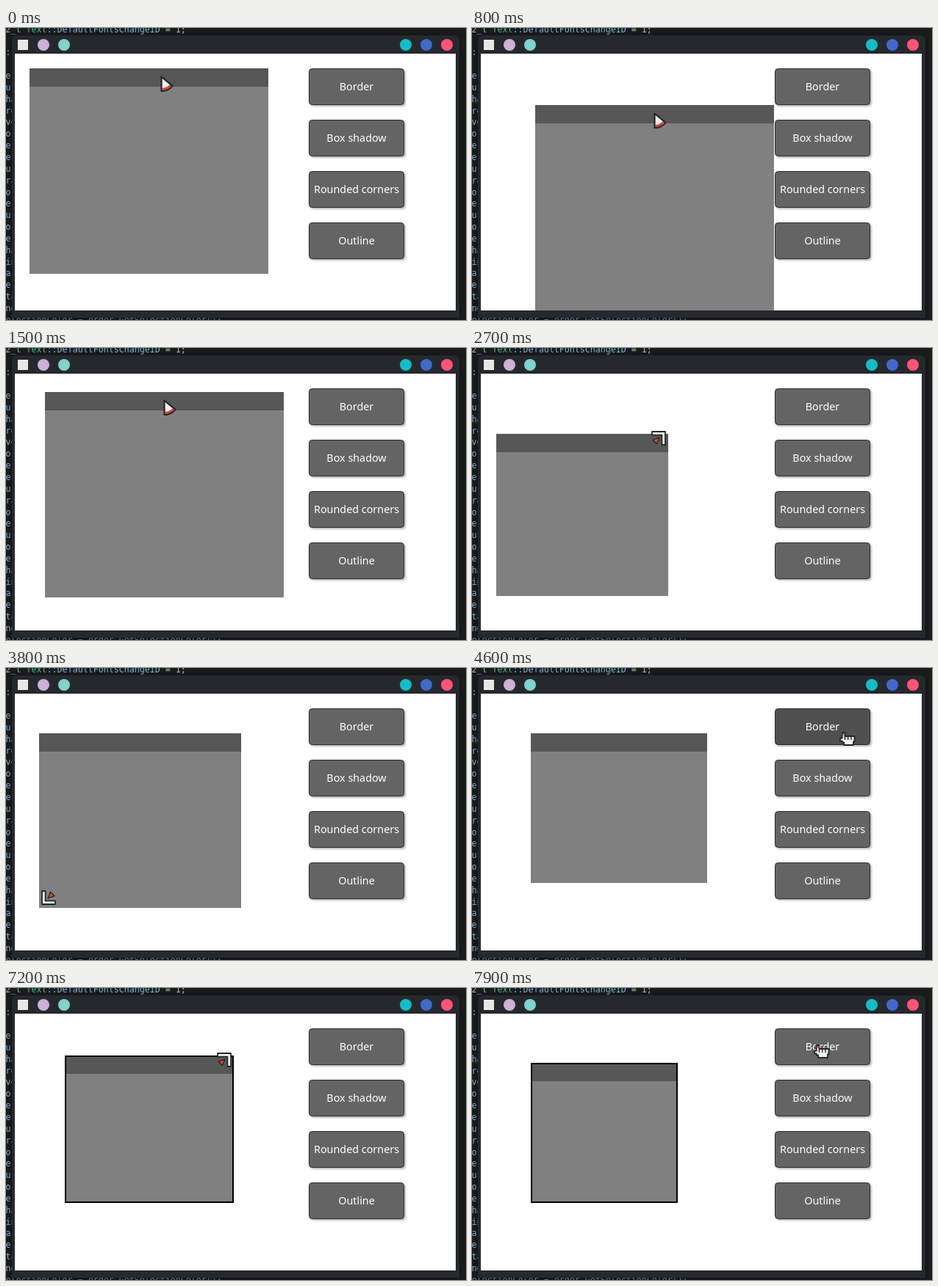
An HTML page that plays this animation: 626x398 px, repeating every 8000 ms.

```html
<!DOCTYPE html>
<html lang="en">
<head>
<meta charset="utf-8">
<title>Resizable window demo</title>
<style>
  html, body { margin: 0; height: 100%; overflow: hidden; background: #1b1c1d; }
  svg { display: block; width: 626px; height: 398px; }
  filter { color-interpolation-filters: sRGB; }
  #code { font: 11.65px "DejaVu Sans Mono", monospace; fill: #7db6d6; white-space: pre; }
  .type { fill: #45b598; }
  .plain { fill: #a9bfb2; }
  .button rect { fill: #646464; stroke: #2c2c2c; filter: url(#soft); }
  .button text { font: 14.35px "Noto Sans", sans-serif; fill: #fff; text-anchor: middle; }
  .cursor { stroke: #262626; stroke-width: 1.8; stroke-linejoin: round; fill: #f0f0ee; }
  .cursor .red { fill: #d8452f; }
</style>
</head>
<body>
<svg viewBox="0 0 626 398">
  <defs>
    <filter id="soft" x="-10%" y="-20%" width="120%" height="150%">
      <feDropShadow dx="2" dy="2" stdDeviation="1.3" flood-color="#000" flood-opacity=".28"/>
    </filter>
    <filter id="frameShadow">
      <feDropShadow dx="0" dy="1" stdDeviation="4" flood-color="#000" flood-opacity=".4"/>
    </filter>
    <clipPath id="content"><rect x="12" y="35" width="600" height="350"/></clipPath>
  </defs>

  <rect width="626" height="398" fill="#1b1c1d"/>
  <g id="code"></g>

  <path d="M8 395V17q0-7 7-7H610q7 0 7 7V395z" fill="#25292e" filter="url(#frameShadow)"/>
  <rect x="12" y="35" width="600" height="350" fill="#fff"/>
  <rect x="16" y="16" width="14" height="14" fill="#ebe7e1"/>
  <g id="dots"></g>
  <g id="buttons"></g>

  <g clip-path="url(#content)">
    <rect id="body" fill="#808080"/>
    <rect id="title" height="25" fill="#575757"/>
    <rect id="border" fill="none" stroke="#000" stroke-width="2"/>
  </g>

  <g id="arrow" class="cursor">
    <path d="M.5.5 15.5 13Q10 20 .5 20z"/>
    <path class="red" stroke="none" d="M1.4 16Q8 15.6 12 11L14.3 13Q9.5 19.1 1.4 19.1z"/>
    <path fill="none" d="M.5.5 15.5 13Q10 20 .5 20z"/>
  </g>
  <g id="corner" class="cursor">
    <path d="M-18 1H0V19H-4.6V5.6H-18z"/>
    <path class="red" stroke-width="1.3" d="M-8 9-17 12.3-11.5 17.7z"/>
  </g>
  <g id="hand" class="cursor">
    <path d="M2.8 1H6.5V6H19.5V13.5H18V18H5.2V14.5H2.8V12.5H0V8.5H2.8z"/>
    <path class="red" stroke="none" d="M3.6 1.8H5.8V4.5H3.6z"/>
    <path fill="none" stroke-width="1.4" d="M6.5 6V11M10.7 7V11M15 7V11"/>
  </g>
</svg>
<script>
const $ = id => document.getElementById(id);
const LOOP = 8000, STEP = 100;
const BUTTON = { x: 412, y: 55, width: 130, height: 50, pitch: 70 };

const codeLines = [
  '2_t <tspan class="type">Text</tspan>::DefaultFontsChangeID <tspan class="plain">= 1;</tspan>',
  '', ':', '',
  ...'e u ha re ve o e e u ra o e u o e ha in a e ta ne'.split(' '),
  '<tspan opacity=".7">electionColor = order.GetSelectionColor();</tspan>'
];
$('code').innerHTML = codeLines
  .map((line, i) => `<text x="-.5" y="${5.6 + i * 15.85}">${line}</text>`).join('');

$('dots').innerHTML = [[51, '#cfb0d6'], [79, '#80d4c8'], [544, '#14bcc8'], [572, '#4169c8'], [600, '#ff5379']]
  .map(([x, fill]) => `<circle cx="${x}" cy="23" r="8" fill="${fill}"/>`).join('');

$('buttons').innerHTML = ['Border', 'Box shadow', 'Rounded corners', 'Outline']
  .map((label, i) => `<g class="button" transform="translate(${BUTTON.x} ${BUTTON.y + i * BUTTON.pitch})">
    <rect x=".5" y=".5" width="129" height="49" rx="4"/><text x="65" y="30">${label}</text></g>`).join('');
const borderButton = document.querySelector('.button rect');

// Which window edges follow the pointer while a part is held
const grips = {
  title: ['left', 'top', 'right', 'bottom'],
  topRight: ['right', 'top'],
  bottomLeft: ['left', 'bottom']
};

// Pointer moves: start, end, x, y, held part; the pointer rests in between
const moves = [
  [100, 400, 194, 66],
  [500, 800, 248, 116, 'title'],
  [800, 1000, 286, 128, 'title'],
  [1000, 1400, 271, 75, 'title'],
  [1400, 1500, 215, 71, 'title'],
  [1500, 1600, 195, 69, 'title'],
  [1600, 2100, 354, 54],
  [2300, 2700, 263, 113, 'topRight'],
  [2700, 3200, 316, 85, 'topRight'],
  [3400, 3700, 37, 334],
  [3700, 4100, 84, 289, 'bottomLeft'],
  [4100, 4300, 314, 110],
  [4300, 4600, 501, 87],
  [5000, 5800, 477, 87],
  [6100, 6200, 409, 108],
  [6200, 7000, 316, 85],
  [7100, 7500, 276, 98, 'topRight'],
  [7500, 7900, 466, 77]
];

function stateAt(t) {
  const state = { x: 211, y: 66, left: 32, top: 55, right: 357, bottom: 335 };
  for (const [start, end, x, y, grip] of moves) {
    if (t <= start) break;
    const k = Math.min(1, (t - start) / (end - start));
    const dx = Math.round((x - state.x) * k), dy = Math.round((y - state.y) * k);
    state.x += dx;
    state.y += dy;
    for (const edge of grips[grip] || []) {
      state[edge] += edge === 'left' || edge === 'right' ? dx : dy;
    }
  }
  return state;
}

const overButton = ({ x, y }) =>
  x >= BUTTON.x && x <= BUTTON.x + BUTTON.width &&
  y >= BUTTON.y && (y - BUTTON.y) % BUTTON.pitch <= BUTTON.height;

function setAttrs(el, attrs) {
  for (const name in attrs) el.setAttribute(name, attrs[name]);
}

const visibility = shown => shown ? 'visible' : 'hidden';

function draw(t) {
  const now = stateAt(t);
  const { x, y, left, top, right, bottom } = now;
  const width = right - left, height = bottom - top;
  setAttrs($('body'), { x: left, y: top, width, height });
  setAttrs($('title'), { x: left, y: top, width });
  setAttrs($('border'), {
    x: left + 1, y: top + 1, width: width - 2, height: height - 2,
    visibility: visibility(t >= 5200)
  });

  const pressed = t >= 5100 && t < 5300, hovered = t >= 4600 && t < 6300;
  borderButton.style.fill = pressed ? '#444' : hovered ? '#505050' : '#646464';

  // The hand stays one step longer after leaving a button
  const near = (cornerX, cornerY) => Math.hypot(x - cornerX, y - cornerY) < 8;
  const atBottomLeft = near(left, bottom);
  const shape = atBottomLeft || near(right, top) ? 'corner'
    : overButton(now) || overButton(stateAt(t - STEP)) ? 'hand' : 'arrow';
  for (const id of ['arrow', 'corner', 'hand']) {
    setAttrs($(id), {
      transform: `translate(${x} ${y})${atBottomLeft ? ' scale(-1)' : ''}`,
      visibility: visibility(id === shape)
    });
  }
}

function tick() {
  draw(Math.floor(performance.now() % LOOP / STEP) * STEP);
  requestAnimationFrame(tick);
}
tick();
</script>
</body>
</html>
```
